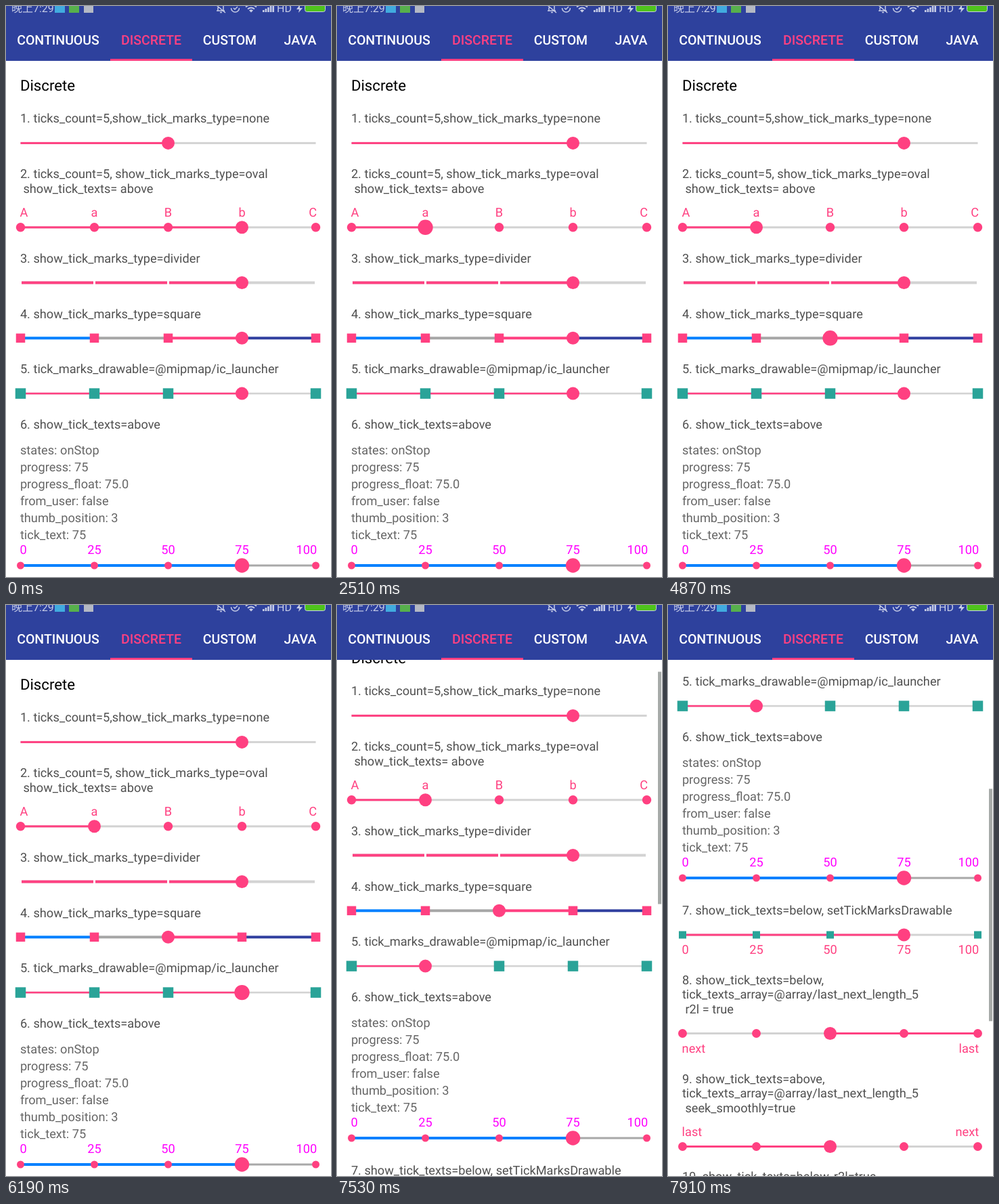
Recreate the animation shown at these times as an HTML page with a canvas. Size 480x843 px, loop 8000 ms.

```html
<!DOCTYPE html>
<html lang="en">
<head>
<meta charset="utf-8">
<title>Discrete seek bars</title>
<style>
html, body { margin: 0; width: 480px; height: 843px; overflow: hidden; background: #fff; }
canvas { display: block; }
</style>
</head>
<body>
<canvas id="stage" width="480" height="843"></canvas>
<script>
const ctx = document.getElementById('stage').getContext('2d');
const LOOP = 8000;
const PINK = '#ff4081', GREY = '#d3d3d3', TEAL = '#2aa398', BLUE = '#0080ff', NAVY = '#303f9f', BAR = '#2e419d';
const LEFT = 21.5, STEP = 109;
const tickX = i => LEFT + i * STEP;

// moves: [time, tick]; the thumb is pressed from the first move until `release`
const sliders = [
  { y: 202.4, start: 2, release: 1510,
    moves: [[120, 3], [220, 1], [600, 2], [700, 3], [880, 2], [980, 1], [1170, 2], [1270, 3]] },
  { y: 326.8, start: 3, mark: 'oval', size: 13.5, release: 2820,
    labels: ['A', 'a', 'B', 'b', 'C'], labelY: 311,
    moves: [[1510, 3], [1920, 2], [2020, 1], [2320, 3], [2510, 1]] },
  { y: 408.5, start: 3, mark: 'divider', line: 4, back: 4, release: 4350,
    moves: [[2820, 2], [3160, 3], [3260, 2], [3350, 1], [3450, 0], [3550, 2], [3640, 3], [3830, 2], [4020, 3]] },
  { y: 490.3, start: 3, mark: 'square', size: 13.5, sections: [BLUE, '#a6a6a6', PINK, NAVY], release: 5930,
    moves: [[4350, 3], [4870, 2], [4970, 1], [5260, 2], [5350, 3], [5540, 1], [5630, 0], [5730, 2]] },
  { y: 572.1, start: 3, mark: 'square', size: 15.5, color: TEAL, line: 2.6, back: 2.6, release: 7330,
    moves: [[6020, 2], [6190, 3], [6380, 2], [6480, 1], [6670, 2], [6770, 3], [6960, 2], [7060, 1]] },
  { y: 826, start: 3, mark: 'oval', size: 11, radius: 10.7, line: 4, fill: BLUE, bg: '#a8a8a8',
    labels: [0, 25, 50, 75, 100], labelY: 809, labelColor: '#f0f' },
  { y: 910, start: 3, mark: 'square', size: 11, color: TEAL,
    labels: [0, 25, 50, 75, 100], labelY: 938 },
  { y: 1055.5, start: 2, mark: 'oval', size: 13, reversed: true,
    labels: ['next', '', '', '', 'last'], labelY: 1084 },
  { y: 1222.5, start: 2, mark: 'oval', size: 13,
    labels: ['last', '', '', '', 'next'], labelY: 1207 },
];

const captions = [
  [172, '1. ticks_count=5,show_tick_marks_type=none'],
  [254, '2. ticks_count=5, show_tick_marks_type=oval'],
  [276, ' show_tick_texts= above'],
  [379, '3. show_tick_marks_type=divider'],
  [461, '4. show_tick_marks_type=square'],
  [542, '5. tick_marks_drawable=@mipmap/ic_launcher'],
  [624, '6. show_tick_texts=above'],
  [880, '7. show_tick_texts=below, setTickMarksDrawable'],
  [983, '8. show_tick_texts=below,'],
  [1004, 'tick_texts_array=@array/last_next_length_5'],
  [1026, ' r2l = true'],
  [1129, '9. show_tick_texts=above,'],
  [1150, 'tick_texts_array=@array/last_next_length_5'],
  [1172, ' seek_smoothly=true'],
  [1273, '10. show_tick_texts=below, r2l=true'],
];
const states = ['states: onStop', 'progress: 75', 'progress_float: 75.0',
  'from_user: false', 'thumb_position: 3', 'tick_text: 75'];
const scrollSteps = [[7430, 10], [7530, 39], [7630, 110], [7720, 210], [7820, 325], [7910, 423]];

// Value of the latest [time, value] step that has been reached
function valueAt(steps, t, initial) {
  let value = initial;
  for (const [time, next] of steps) if (t >= time) value = next;
  return value;
}

function text(str, x, y, { size = 18.2, color = '#505050', weight = 400, align = 'left' } = {}) {
  ctx.font = `${weight} ${size}px Roboto, "Noto Sans CJK SC", sans-serif`;
  ctx.textRendering = 'geometricPrecision';
  ctx.fillStyle = color;
  ctx.textAlign = align;
  ctx.fillText(str, x, y);
}

function rect(x, y, w, h, color) {
  ctx.fillStyle = color;
  ctx.fillRect(x, y, w, h);
}

function disc(x, y, r, color = PINK) {
  ctx.fillStyle = color;
  ctx.beginPath();
  ctx.arc(x, y, r, 0, Math.PI * 2);
  ctx.fill();
}

function stroke(path, color, width = 1.5) {
  ctx.strokeStyle = color;
  ctx.lineWidth = width;
  ctx.stroke(new Path2D(path));
}

function drawSlider(s, t) {
  const { y, moves = [], mark, size, color = PINK, line = 3, back = 3 } = s;
  const pos = valueAt(moves, t, s.start);
  const pressed = moves.length && t >= moves[0][0] && t < s.release;
  const track = (a, b, h, c) => rect(tickX(a), y - h / 2, (b - a) * STEP, h, c);

  if (s.sections) {
    s.sections.forEach((c, i) => track(i, i + 1, 4, c));
  } else {
    track(0, 4, back, s.bg || GREY);
    track(s.reversed ? pos : 0, s.reversed ? 4 : pos, line, s.fill || PINK);
  }
  for (let i = 0; i < 5; i++) {
    const x = tickX(i);
    if (i !== pos) {
      if (mark === 'oval') disc(x, y, size / 2);
      if (mark === 'square') rect(x - size / 2, y - size / 2, size, size, color);
      if (mark === 'divider') rect(x - 1.5, y - 3, 3, 6, '#fff');
    }
    if (s.labels) {
      const [lx, align] = i === 0 ? [20.6, 'left'] : i === 4 ? [459.2, 'right'] : [x, 'center'];
      text(s.labels[i], lx, s.labelY, { color: s.labelColor || PINK, align });
    }
  }
  disc(tickX(pos), y, pressed ? 11.2 : s.radius || 9.5);
}

function drawStatusBar() {
  const ink = '#c6cce6';
  text('晚上7:29', 8, 9, { size: 16, color: ink });
  rect(72, 0, 15, 10, '#41abdf');
  rect(93, 0, 15, 10, '#57b04c');
  rect(115, 0, 14, 10, '#b5b9c4');
  stroke('M311 7h12M313 7V0M321 7V0M316 9.5h3M311 -1l13 11', ink);
  stroke('M332.5 3a6 6 0 0 0 12 0M336 3l2 2 4-4', ink);
  ctx.fillStyle = ink;
  ctx.fill(new Path2D('M359 6.5q3-2.5 6 0l-3 3z'));
  stroke('M357 4.5q5-4 10 0M354 1.5q8-6.5 16 0', ink, 1.8);
  for (let i = 0; i < 5; i++) rect(379 + i * 3.6, 6 - i * 2, 2.6, 3 + i * 2, ink);
  text('HD', 400, 9, { size: 16, color: ink });
  ctx.fill(new Path2D('M434 -2l-5 7h4l-1 5 6-7h-4z'));
  ctx.beginPath();
  ctx.roundRect(441.5, -5, 30, 13.5, 3);
  ctx.fillStyle = '#4fc31c';
  ctx.fill();
  ctx.strokeStyle = ink;
  ctx.lineWidth = 1;
  ctx.stroke();
}

function drawHeader() {
  rect(0, 0, 480, 81, BAR);
  drawStatusBar();
  const tabs = [['CONTINUOUS', 77], ['DISCRETE', 214.5], ['CUSTOM', 330.5], ['JAVA', 434.5]];
  tabs.forEach(([name, x], i) =>
    text(name, x, 57, { size: 19.5, weight: 500, align: 'center', color: i === 1 ? PINK : '#fff' }));
  rect(154, 78, 121, 3, PINK);
}

function draw(t) {
  const scroll = valueAt(scrollSteps, t, 0);
  rect(0, 0, 480, 843, '#fff');
  ctx.save();
  ctx.translate(0, -scroll);
  text('Discrete', 20.9, 125, { size: 22.2, color: '#000' });
  captions.forEach(([y, str]) => text(str, 20.9, y));
  states.forEach((str, i) => text(str, 20.9, Math.round(662.4 + i * 24.85), { color: '#666' }));
  sliders.forEach(s => drawSlider(s, t));
  ctx.restore();
  if (scroll) rect(474, 81 + scroll * 0.45, 5, 343, '#a6aaa8');
  drawHeader();
}

function tick() {
  draw(performance.now() % LOOP);
  requestAnimationFrame(tick);
}
tick();
</script>
</body>
</html>
```
